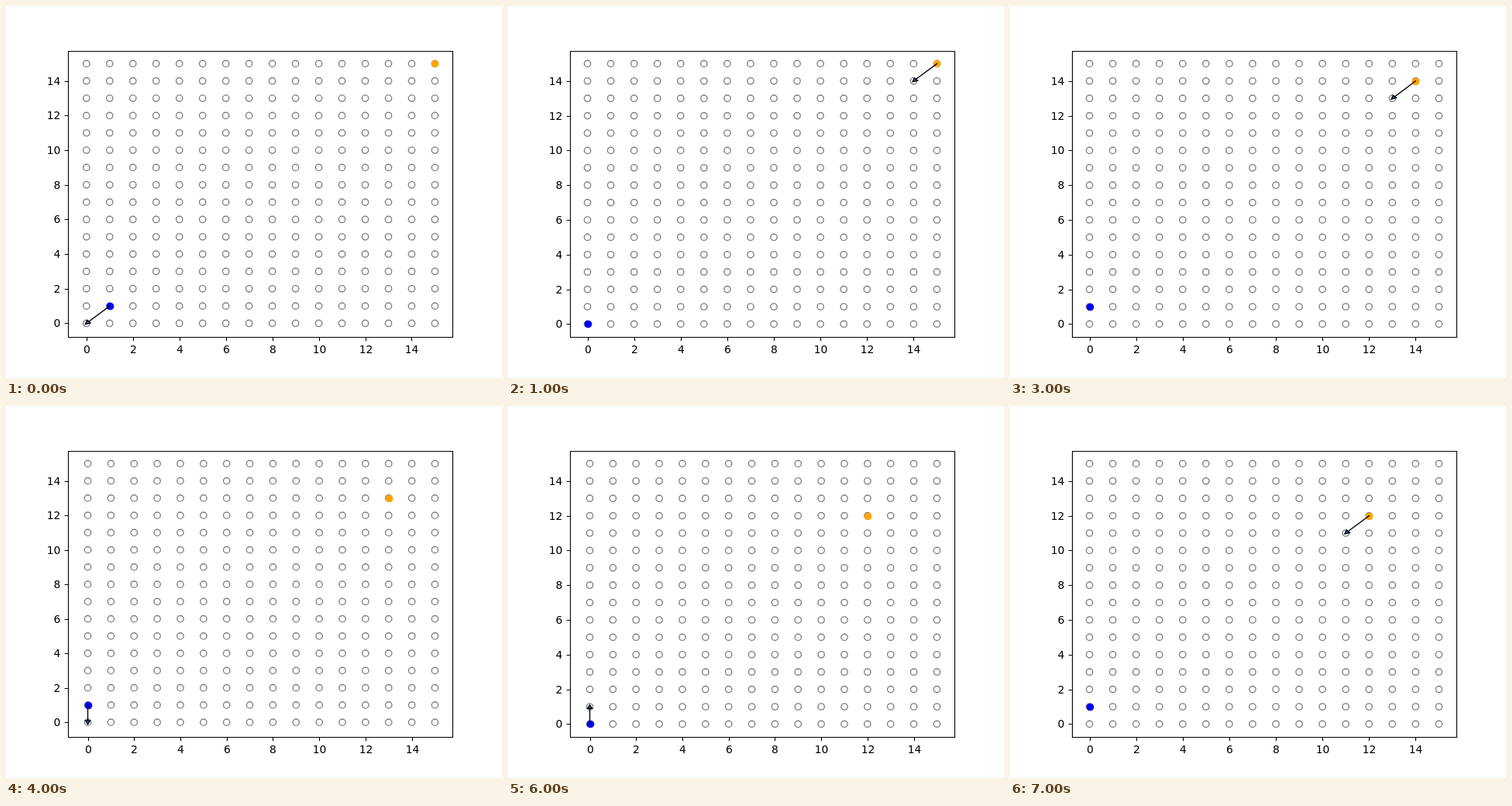
These frames come from a looping animation (640x480 px, 8 s). An HTML page:

```html
<!DOCTYPE html>
<html lang="en">
<head>
<meta charset="utf-8">
<title>Grid moves</title>
<style>
  html, body { margin: 0; width: 100%; height: 100%; overflow: hidden; background: #fff; }
  svg { display: block; }
  text { font: 13.89px "DejaVu Sans", sans-serif; }
  .rings { fill: none; stroke: #808080; stroke-width: 1.39; }
  .axes { fill: none; stroke: #000; stroke-width: 1.11; }
  .arrow { fill: #1f77b4; stroke: #000; stroke-width: 1.39; stroke-linecap: square; stroke-miterlimit: 10; }
</style>
</head>
<body>
<svg id="stage" width="640" height="480" viewBox="0 0 640 480"></svg>
<script>
const STEP = 1000;
const MAX = 15;
const BOX = { left: 80, right: 576, top: 57.6, bottom: 427.2 };
const INNER_W = (BOX.right - BOX.left) / 1.1;
const INNER_H = (BOX.bottom - BOX.top) / 1.1;
const RIGHT = BOX.right - INNER_W / 20;
const TOP = BOX.top + INNER_H / 20;

// Each step: blue cell, orange cell, who moves, and the direction
const steps = [
  { blue: [1, 1], orange: [15, 15], mover: 'blue', dir: [-1, -1] },
  { blue: [0, 0], orange: [15, 15], mover: 'orange', dir: [-1, -1] },
  { blue: [0, 0], orange: [14, 14], mover: 'blue', dir: [0, 1] },
  { blue: [0, 1], orange: [14, 14], mover: 'orange', dir: [-1, -1] },
  { blue: [0, 1], orange: [13, 13], mover: 'blue', dir: [0, -1] },
  { blue: [0, 0], orange: [13, 13], mover: 'orange', dir: [-1, -1] },
  { blue: [0, 0], orange: [12, 12], mover: 'blue', dir: [0, 1] },
  { blue: [0, 1], orange: [12, 12], mover: 'orange', dir: [-1, -1] }
];

const stage = document.getElementById('stage');
const snap = v => Math.round(v) + 0.5;
const circle = (x, y, r, extra = '') => `<circle cx="${x}" cy="${y}" r="${r}" ${extra}/>`;
const label = (x, y, anchor, n) => `<text x="${x}" y="${y}" text-anchor="${anchor}">${n}</text>`;

function arrowPoints([x, y], [dx, dy]) {
  const len = Math.hypot(dx, dy);
  const ux = dx / len, uy = dy / len;
  const bx = x + 0.9 * dx, by = y + 0.9 * dy;
  const base = [bx, by];
  return [
    [x, y], base,
    [bx - 0.1 * uy, by + 0.1 * ux],
    [bx + 0.2 * ux, by + 0.2 * uy],
    [bx + 0.1 * uy, by - 0.1 * ux],
    base
  ];
}

function scene(step) {
  const arrow = arrowPoints(step[step.mover], step.dir);
  // The axes rescale to hold the arrow head
  const low = i => Math.min(0, ...arrow.map(p => p[i]));
  const sx = INNER_W / (MAX - low(0));
  const sy = INNER_H / (MAX - low(1));
  const X = v => RIGHT - (MAX - v) * sx;
  const Y = v => TOP + (MAX - v) * sy;

  let rings = '', ticks = '', labels = '';
  for (let i = 0; i <= MAX; i++) {
    for (let j = 0; j <= MAX; j++) rings += circle(X(i), Y(j), 4.17);
  }
  for (let n = 0; n < MAX; n += 2) {
    const x = snap(X(n)), y = snap(Y(n));
    ticks += `M${x} 427.5v4.86M80.5 ${y}h-4.86`;
    labels += label(x, 448, 'middle', n) + label(70.3, y + 4.5, 'end', n);
  }
  const dot = name => circle(snap(X(step[name][0])), snap(Y(step[name][1])), 4.86, `fill="${name}"`);
  const outline = arrow.map(([x, y]) => `${X(x)} ${Y(y)}`).join('L');

  return `<g class="rings">${rings}</g>${dot('blue')}${dot('orange')}
    <path class="arrow" d="M${outline}"/>
    <path class="axes" d="M80.5 58.5H576.5V427.5H80.5Z${ticks}"/>${labels}`;
}

stage.innerHTML = steps.map(s => `<g visibility="hidden">${scene(s)}</g>`).join('');
const scenes = [...stage.children];
const start = performance.now();
let shown = -1;

function draw(now) {
  const k = Math.floor(Math.max(0, now - start) / STEP) % steps.length;
  if (k !== shown) {
    scenes.forEach((g, i) => g.setAttribute('visibility', i === k ? 'visible' : 'hidden'));
    shown = k;
  }
  requestAnimationFrame(draw);
}
draw(start);
</script>
</body>
</html>
```
